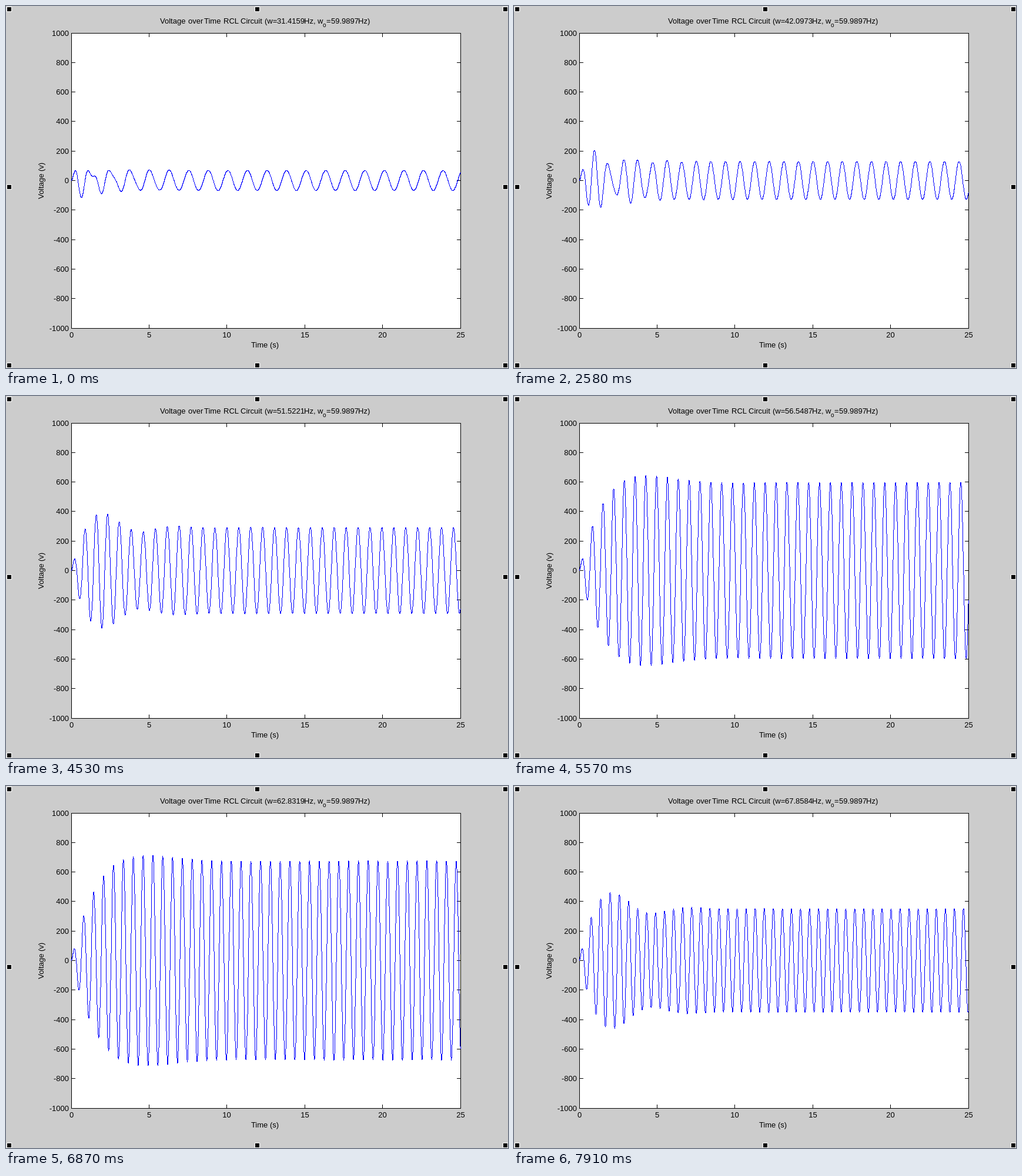
An HTML page with a canvas for the animation above (8 s loop, 854 px wide and 617 px high).

```html
<!DOCTYPE html>
<html lang="en">
<head>
<meta charset="utf-8">
<title>RCL circuit response</title>
<style>
  html, body { margin: 0; width: 100%; height: 100%; overflow: hidden; background: #ccc; }
  canvas, svg { position: absolute; left: 0; top: 0; }
  text { font: 13px "Liberation Sans", Arial, sans-serif; fill: #000; white-space: pre; }
  .sub { font-size: 10px; }
</style>
</head>
<body>
<canvas id="plot" width="854" height="617"></canvas>
<svg id="labels" width="854" height="617"></svg>
<script>
const LOOP = 8000, HOLD = 500, STEP = 130;
const BOX = { left: 111, top: 46, width: 662, height: 503 };
const T_MAX = 25, V_MAX = 1000, DT = 0.01;
const TAU = 2 * Math.PI;
const RESONANCE = 59.9897 / TAU, DRIVE = 900, DAMPING = 1;

const ctx = document.getElementById('plot').getContext('2d');
const svg = document.getElementById('labels');

const pxX = t => Math.floor(BOX.left + t / T_MAX * BOX.width);
const pxY = v => Math.floor(BOX.top + (1 - v / V_MAX) / 2 * BOX.height);

function rect(color, x, y, w, h) {
  ctx.fillStyle = color;
  ctx.fillRect(x, y, w, h);
}

function label(string, x, y, anchor = 'middle') {
  const node = document.createElementNS('http://www.w3.org/2000/svg', 'text');
  node.textContent = string;
  node.setAttribute('x', x);
  node.setAttribute('y', y);
  node.setAttribute('text-anchor', anchor);
  svg.append(node);
  return node;
}

// Title pieces with their advance on a whole-pixel grid.
const title = [
  ['Voltage', 48], ['over', 27], ['Time', 33], ['RCL', 29], ['Circuit', 41],
  ['(w=', 21], ['', 46], ['Hz,', 23], ['w', 9], ['o', 6], ['=', 8], ['59.9897', 46], ['Hz)', 19]
].map(([string, advance]) => ({ advance, node: label(string, 0, 30, 'start') }));
const value = title[6];
title[9].node.setAttribute('y', 36);
title[9].node.classList.add('sub');

function setTitle(w) {
  const string = String(+(w * TAU).toFixed(4));
  value.node.textContent = string;
  value.advance = 7 * string.length - 3;
  let x = Math.round(440 - title.reduce((sum, p) => sum + p.advance, 0) / 2);
  for (const { node, advance } of title) {
    node.setAttribute('x', x);
    x += advance;
  }
}

function addLabels() {
  for (let v = -V_MAX; v <= V_MAX; v += 200) label(v, 107, pxY(v) + 5, 'end');
  for (let t = 0; t <= T_MAX; t += 5) label(t, pxX(t) + 0.5, 565);
  label('Time (s)', 440.5, 582);
  label('Voltage (v)', 0, 0).setAttribute('transform', 'translate(64 298) rotate(-90)');
}

function drawAxes() {
  const { left, top, width, height } = BOX;
  rect('#ccc', 0, 0, 854, 617);
  rect('#000', left, top, width + 1, height + 1);
  rect('#fff', left + 1, top + 1, width - 1, height - 1);
  for (let t = 5; t < T_MAX; t += 5) {
    rect('#000', pxX(t), top, 1, 7);
    rect('#000', pxX(t), top + height - 6, 1, 7);
  }
  for (let v = 200 - V_MAX; v < V_MAX; v += 200) {
    rect('#000', left, pxY(v), 7, 1);
    rect('#000', left + width - 6, pxY(v), 7, 1);
  }
  for (const x of [5, 427, 849]) for (const y of [5, 308, 612]) {
    if (x === 427 && y === 308) continue;
    rect('#fff', x - 4, y - 4, 9, 9);
    rect('#000', x - 3, y - 3, 7, 7);
  }
}

// Driven, damped oscillator starting at rest.
function response(w) {
  const gap = RESONANCE ** 2 - w ** 2, loss = DAMPING * w;
  const scale = DRIVE * w / (gap ** 2 + loss ** 2);
  const a = scale * gap, b = scale * loss, decay = DAMPING / 2;
  const free = Math.sqrt(RESONANCE ** 2 - decay ** 2);
  const c = (b * w + a * decay) / free;
  return t => a * Math.cos(w * t) + b * Math.sin(w * t)
    - Math.exp(-decay * t) * (a * Math.cos(free * t) + c * Math.sin(free * t));
}

function column(x, y0, y1) {
  ctx.fillRect(x, Math.min(y0, y1), 1, Math.abs(y1 - y0) + 1);
}

// Samples lie less than a pixel apart, so crisp vertical runs join them.
function drawCurve(w) {
  const voltage = response(w);
  ctx.fillStyle = '#00f';
  let x0 = pxX(0), y0 = pxY(0);
  for (let i = 1; i <= T_MAX / DT; i++) {
    const x1 = pxX(i * DT), y1 = pxY(voltage(i * DT));
    if (x1 === x0) {
      column(x0, y0, y1);
    } else {
      const mid = (y0 + y1) >> 1;
      column(x0, y0, mid);
      column(x1, y1 === mid ? mid : mid + Math.sign(y1 - y0), y1);
    }
    x0 = x1;
    y0 = y1;
  }
}

let shown = -1;
function render(time) {
  const step = time < HOLD ? 0 : 1 + Math.floor((time - HOLD) / STEP);
  if (step === shown) return;
  shown = step;
  const w = (50 + step) / 10;
  drawAxes();
  drawCurve(w);
  setTitle(w);
}

const start = performance.now();
function tick() {
  render((performance.now() - start) % LOOP);
  requestAnimationFrame(tick);
}
addLabels();
tick();
</script>
</body>
</html>
```
